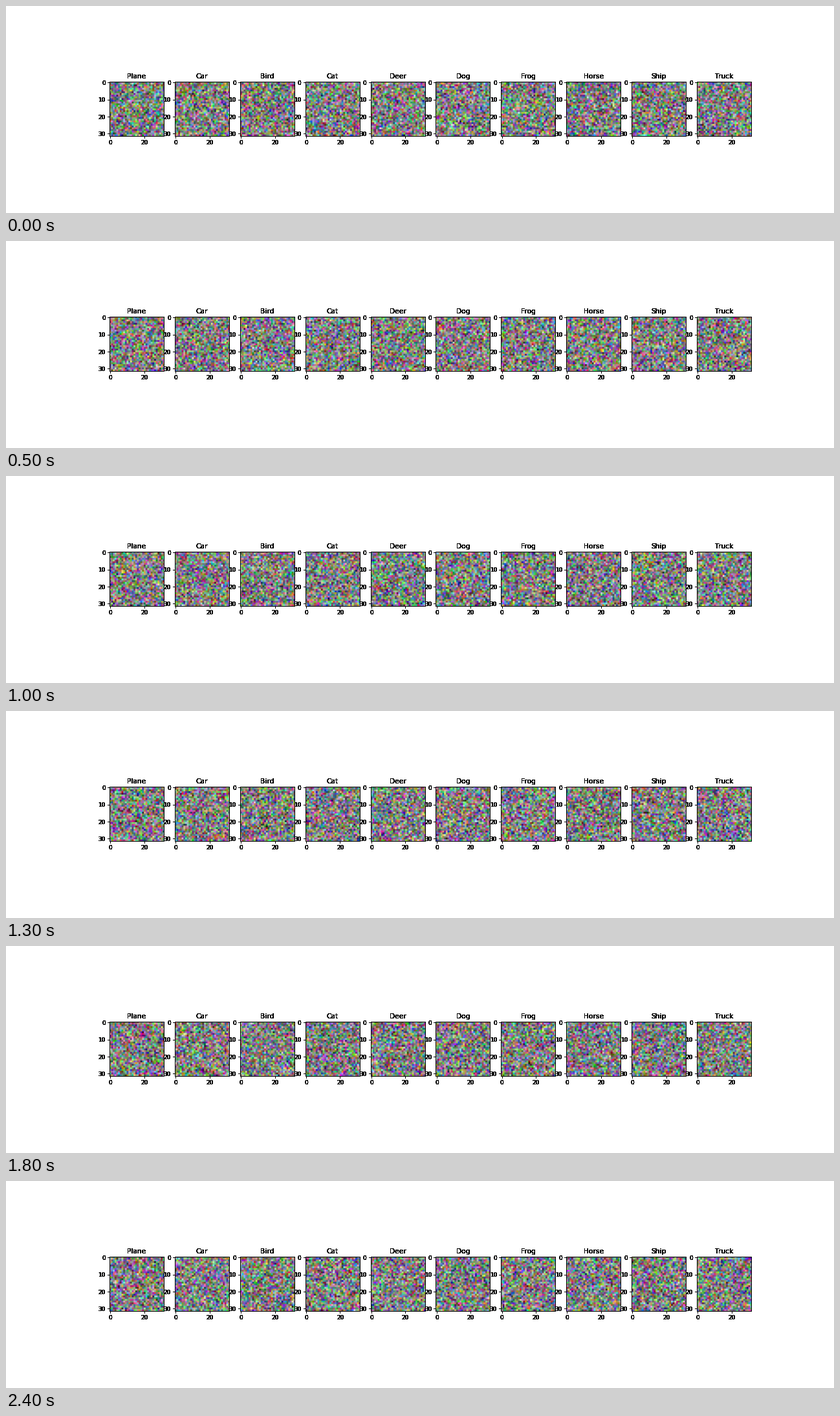
Recreate the animation shown at these times as a matplotlib script. Size 1280 by 320 pixels, loop 2.5 s.

```python
import numpy as np
import matplotlib.pyplot as plt
from matplotlib.animation import FuncAnimation

FRAMES, INTERVAL = 25, 100
SIZE = 32
LABELS = ["Plane", "Car", "Bird", "Cat", "Deer",
          "Dog", "Frog", "Horse", "Ship", "Truck"]

plt.rcParams["font.family"] = "DejaVu Sans"
fig = plt.figure(figsize=(20, 5), dpi=64, facecolor="white")
grid = fig.add_gridspec(1, len(LABELS), left=0.125, right=0.9,
                        bottom=0.125, top=0.88, wspace=0.2)


def harden(artist, passes=10):
    """Draw the artist several times so its soft edges turn solid."""
    draw = artist.draw

    def draw_all(renderer):
        for _ in range(passes):
            draw(renderer)

    artist.draw = draw_all


def noise(frame, col):
    rng = np.random.default_rng(1000 * frame + col)
    return np.clip(rng.normal(0.5, 0.24, (SIZE, SIZE, 3)), 0, 1)


def add_panel(col, label):
    ax = fig.add_subplot(grid[0, col])
    image = ax.imshow(noise(0, col))
    ax.set_xticks([0, 20])
    ax.set_yticks([0, 10, 20, 30])
    ax.tick_params(labelsize=10)
    ax.set_title(label, fontsize=12)

    harden(ax.title)
    for spine in ax.spines.values():
        harden(spine)
    for axis in (ax.xaxis, ax.yaxis):
        for tick in axis.get_major_ticks():
            harden(tick.label1)
            harden(tick.tick1line)
    return image


images = [add_panel(col, label) for col, label in enumerate(LABELS)]


def update(frame):
    for col, image in enumerate(images):
        image.set_data(noise(frame, col))
    return images


anim = FuncAnimation(fig, update, frames=FRAMES, interval=INTERVAL,
                     repeat=True, repeat_delay=0, blit=False)
plt.show()
```
